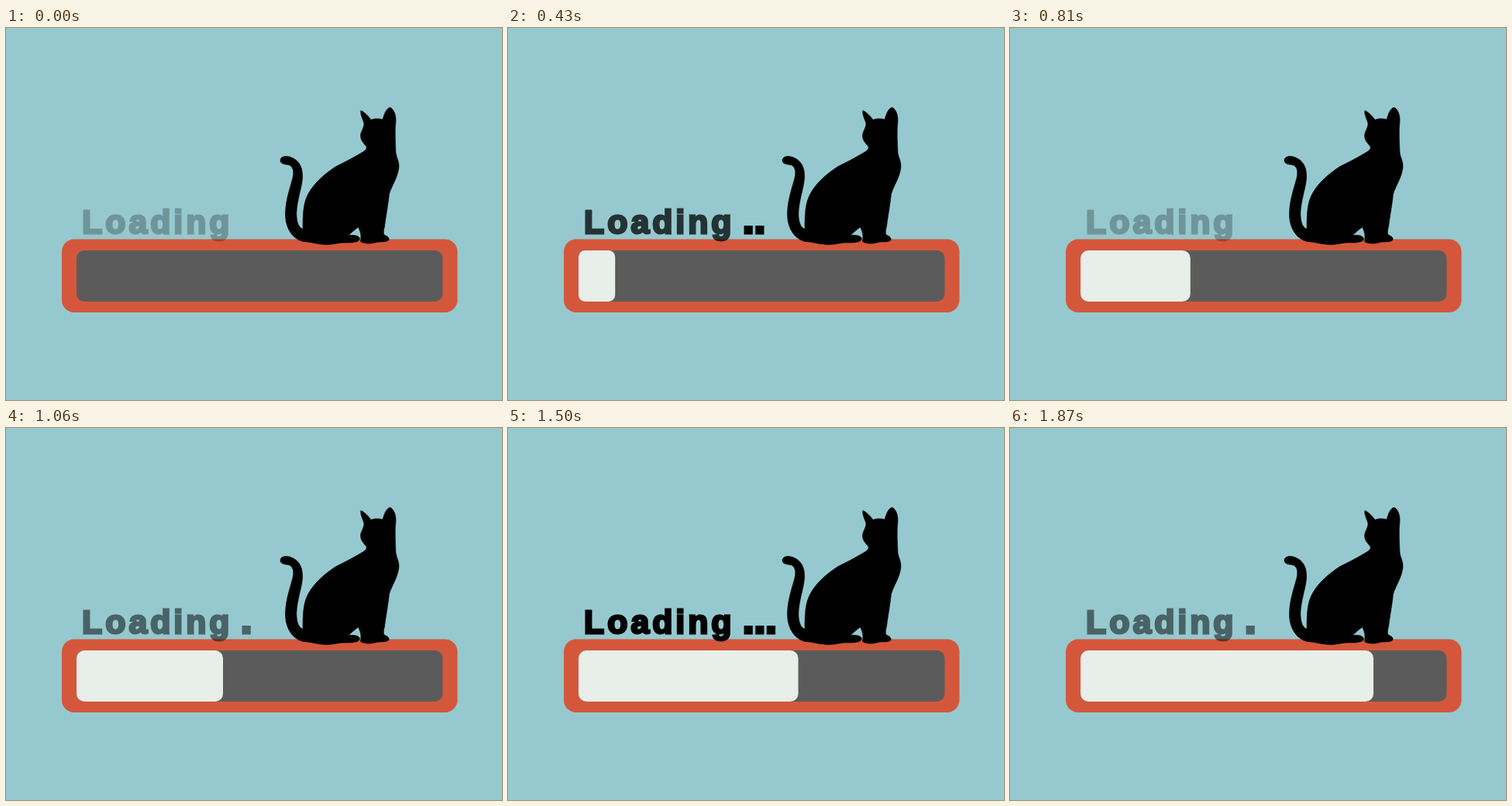
These frames come from a looping animation (640x480 px, 2 s). An HTML page with a canvas:

```html
<!DOCTYPE html>
<html lang="en">
<head>
<meta charset="utf-8">
<title>Loading</title>
<style>
  html, body { margin: 0; width: 100%; height: 100%; overflow: hidden; background: #95c9cf; }
  canvas { display: block; }
</style>
</head>
<body>
<canvas id="stage" width="640" height="480"></canvas>
<script>
const ctx = document.getElementById('stage').getContext('2d');
const LOOP = 2000;
const STEPS = [0, 180, 430, 620, 810, 1060, 1250, 1430, 1680, 1870];
const FONT = 'bold 42.8px "Liberation Sans", Arial, sans-serif';
const TEXT_BOTTOM = 266.7;
const TRACK = { x: 91, y: 287, w: 472.5, h: 66, r: 10 };

const cat = new Path2D(`
  M354 171 C354 165.5 361 164.5 367 166.5 C378.5 170.5 383.3 180 382.5 194
  C381.5 207 375.5 222 374.8 239 C375 250 377 257 383 259.5
  C383 250 383 234 386 224 C391 206 408 190 426 178.5
  C437 173 447 168 457 162 C462 159 466 157 465 153
  C462 149 457 145 457.5 138 C458 133 462 129 462 123
  C460 117 456.5 110 458 106.5 C462 108 468 114 471 118.5
  C475 116.5 481 116.5 486 118 C488 112 490 104 495.5 102.5
  C500 104 503.5 112 503 120 C501.5 132 502.5 148 503 161
  C504 168 507.5 172 507 179 C506 192 498 203 494.5 214
  C493 229 490 243 488.5 256 C487 262 486.5 266 489 267.5
  C494 269 496 273 492 275 C485 277 481 275 476 277
  C470 279 460 278 457.5 275.5 C458 272 459 265 454.5 257
  C450 260 446 264 442 267.5 C449 267 455 267.5 456.5 271.5
  C456 277 447 277 437 277 C428 277 423 279.5 413 279.5
  C401 279 393 276 383 275.5 C370 272 361.5 260 360.5 243
  C360 226 365 211 369 197 C372.5 186 371 178 364 176.5
  C359 176 354 175 354 171 Z`);

// Opaque heavy lettering on its own layer, so it can be faded as a whole.
function lettering(text, x, weight, spacing) {
  const layer = document.createElement('canvas');
  layer.width = 640;
  layer.height = 480;
  const pen = layer.getContext('2d');
  const y = TEXT_BOTTOM - weight / 2;
  pen.font = FONT;
  pen.letterSpacing = spacing + 'px';
  pen.lineWidth = weight;
  pen.miterLimit = 2;
  pen.strokeText(text, x, y);
  pen.fillText(text, x, y);
  return layer;
}

const word = lettering('Loading', 98.1, 2.8, 4);
const dot = lettering('.', 304.2, 5.2, 0);

function box(x, y, w, h, r, color) {
  ctx.fillStyle = color;
  ctx.beginPath();
  ctx.roundRect(x, y, w, h, r);
  ctx.fill();
}

function drawCat() {
  ctx.fillStyle = ctx.strokeStyle = '#000';
  ctx.lineWidth = 0.6;
  ctx.fill(cat);
  ctx.stroke(cat);
}

function drawBar(progress) {
  const { x, y, w, h, r } = TRACK;
  box(72, 272.5, 510.5, 94.5, 16, '#d4573c');
  box(x, y, w, h, r, '#5b5b5b');
  const filled = w * progress;
  if (filled > 0) box(x, y, filled, h, Math.min(r, filled * 0.18), '#e8eeea');
}

function drawLabel(dots) {
  ctx.globalAlpha = (dots + 1) / 4;
  ctx.drawImage(word, 0, 0);
  if (dots > 1) ctx.globalAlpha = 1;
  for (let i = 0; i < dots; i++) ctx.drawImage(dot, i * 14.6, 0);
  ctx.globalAlpha = 1;
}

function draw(time) {
  const step = STEPS.findLastIndex(start => time >= start);
  const progress = step < 2 ? step * 0.05 : (step - 1) / 10;
  ctx.fillStyle = '#95c9cf';
  ctx.fillRect(0, 0, 640, 480);
  drawBar(progress);
  drawLabel(step % 4);
  drawCat();
}

const begin = performance.now();
function tick() {
  draw((performance.now() - begin) % LOOP);
  requestAnimationFrame(tick);
}
tick();
</script>
</body>
</html>
```
